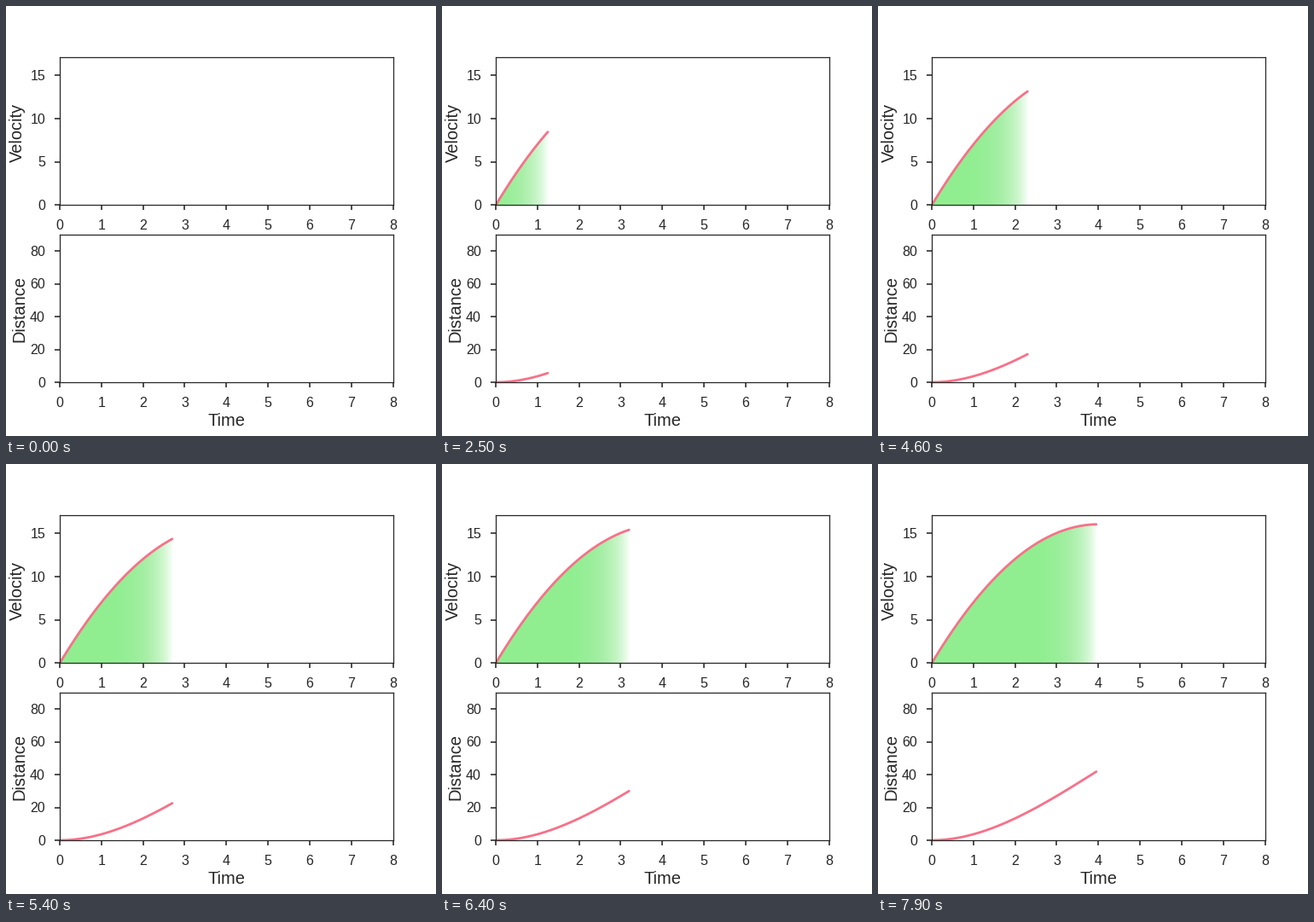
Animation, 504 px wide and 504 px high, one loop 8000 ms. Source, as a matplotlib script:

```python
import matplotlib.pyplot as plt
import numpy as np
from matplotlib.animation import FuncAnimation

SIZE, DPI = 504, 72
FRAMES, STEP = 80, 0.05
INK, PINK, GREEN = "0.15", "#f77189", "lightgreen"

plt.rcParams["font.family"] = ["Liberation Sans", "DejaVu Sans"]

t = np.arange(FRAMES) * STEP
velocity = 8 * t - t**2
distance = 4 * t**2 - t**3 / 3

fig = plt.figure(figsize=(SIZE / DPI, SIZE / DPI), dpi=DPI, facecolor="white")


def put_text(x, y, text, size=16, **kw):
    """Place text by its baseline, in pixels from the top left corner."""
    fig.text(x / SIZE, 1 - y / SIZE, text, size=size, color=INK,
             va="baseline", **kw)


def make_axes(top, height, y_max, y_ticks):
    left, width = 63, 390.6
    bottom = top + height
    ax = fig.add_axes([left / SIZE, 1 - bottom / SIZE,
                       width / SIZE, height / SIZE])
    ax.set(xlim=(0, 8), ylim=(0, y_max), xticks=range(9), yticks=y_ticks)
    ax.tick_params(length=6, width=1.6, color=INK,
                   labelbottom=False, labelleft=False)
    for spine in ax.spines.values():
        spine.set(linewidth=1.25, edgecolor=INK)
    for x in range(9):
        put_text(left + x * width / 8, bottom + 29, str(x), ha="center")
    for y in y_ticks:
        put_text(46, bottom - y / y_max * height + 5.8, str(y), ha="right")
    return ax


def make_line(ax):
    return ax.plot([], [], color=PINK, lw=2.8, solid_capstyle="round")[0]


HEIGHT = 0.755 * SIZE / 2.2
top_ax = make_axes(0.12 * SIZE, HEIGHT, 17, range(0, 16, 5))
low_ax = make_axes(0.875 * SIZE - HEIGHT, HEIGHT, 90, range(0, 81, 20))

upright = dict(size=20, rotation=90, rotation_mode="anchor", ha="center")
put_text(19, 148, "Velocity", **upright)
put_text(21, 355.5, "Distance", **upright)
put_text(258.3, 492, "Time", size=20, ha="center")

v_line, d_line = make_line(top_ax), make_line(low_ax)

# Faint overlapping fills build up the soft leading edge.
fills = [top_ax.fill_between(t[:n + 1], velocity[:n + 1], facecolor=GREEN,
                             alpha=0.1, linewidth=0, visible=False)
         for n in range(1, FRAMES)]


def draw(n):
    shown = slice(0, n + 1 if n else 0)
    v_line.set_data(t[shown], velocity[shown])
    d_line.set_data(t[shown], distance[shown])
    for i, fill in enumerate(fills, 1):
        fill.set_visible(i <= n)
    return [v_line, d_line, *fills]


anim = FuncAnimation(fig, draw, frames=FRAMES, interval=100,
                     repeat=True, repeat_delay=0, blit=False)
plt.show()
```
